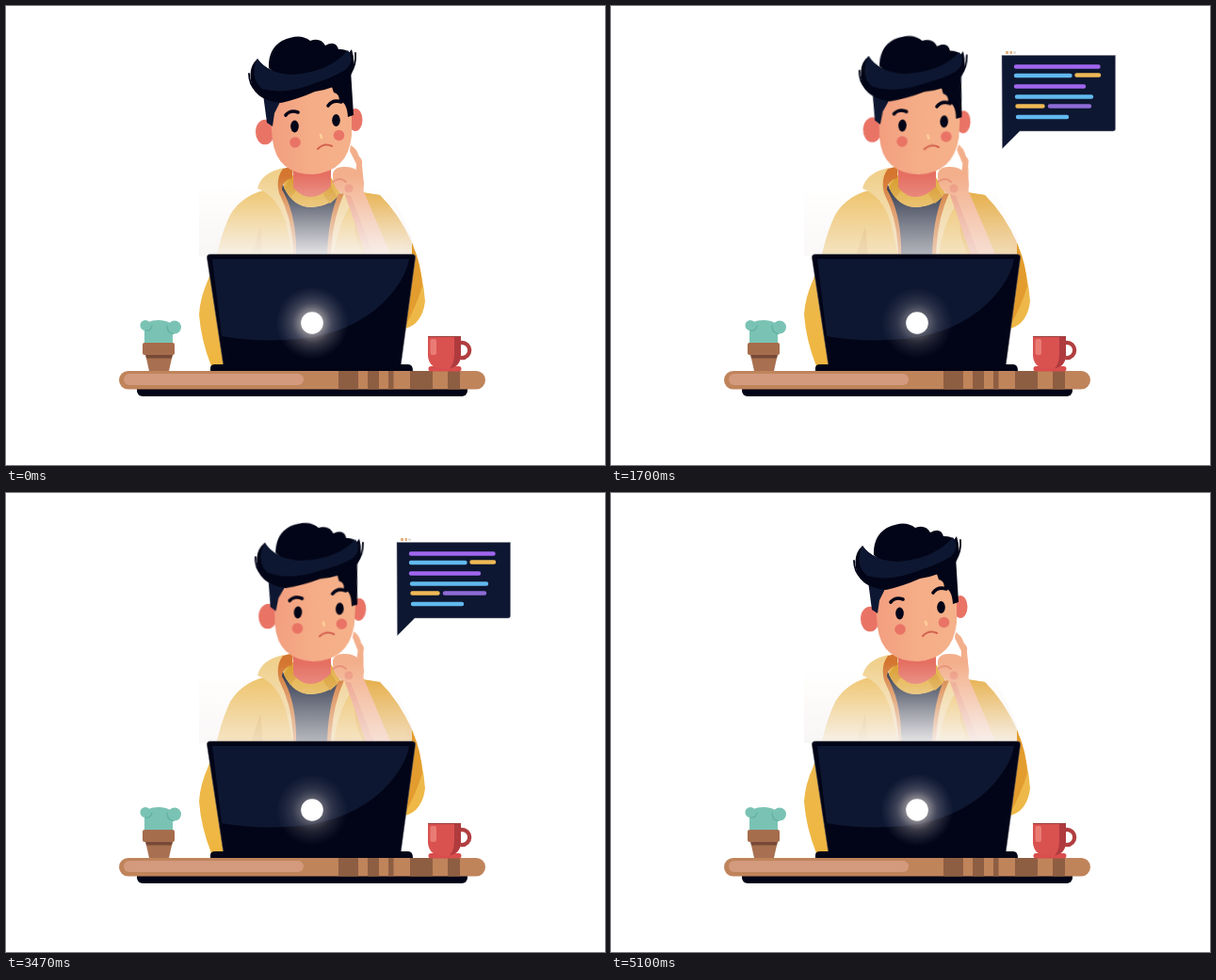
An HTML page without scripts for the animation above (5170 ms loop, 636x488 px).

```html
<!DOCTYPE html>
<html lang="en">
<head>
<meta charset="utf-8">
<title>Thinking developer</title>
<style>
  :root { --loop: 5170ms; --typing: calc(var(--loop) / 3); }
  html, body { margin: 0; width: 100%; height: 100%; overflow: hidden; background: #fff; }
  svg { display: block; width: 100%; height: 100%; }

  .head, .finger { animation: tilt var(--loop) infinite; }
  .head { --turn: 3.4deg; transform-origin: 326px 186px; }
  .finger { --turn: 5deg; transform-origin: 377px 186px; }
  @keyframes tilt {
    0%, 9.1% { transform: rotate(0deg); animation-timing-function: ease-in-out; }
    42%, 67.7% { transform: rotate(var(--turn)); animation-timing-function: ease-in-out; }
    98.6%, 100% { transform: rotate(0deg); }
  }

  .light { animation: light var(--loop) linear infinite; }
  @keyframes light {
    0%, 4.4% { opacity: 1; }
    13.3% { opacity: .05; }
    22.4% { opacity: .85; }
    32.9% { opacity: .75; }
    46.2% { opacity: .03; }
    47.5% { opacity: .03; }
    55.3% { opacity: 1; }
    66% { opacity: .8; }
    77.6% { opacity: .5; }
    80.5% { opacity: .2; }
    88% { opacity: .85; }
    98.6%, 100% { opacity: 1; }
  }

  .glow { animation: glow var(--loop) linear infinite; }
  @keyframes glow {
    0%, 4.4% { opacity: 1; }
    13.3% { opacity: .4; }
    22.4% { opacity: .75; }
    32.9% { opacity: .65; }
    46.2% { opacity: .5; }
    55.3% { opacity: 1; }
    66% { opacity: .7; }
    77.6% { opacity: .15; }
    88% { opacity: .7; }
    98.6%, 100% { opacity: 1; }
  }

  .bubble { transform-origin: 415px 151px; animation: pop var(--loop) infinite; }
  @keyframes pop {
    0%, 4.4% { transform: scale(0); animation-timing-function: ease-out; }
    9% { transform: scale(1.02); animation-timing-function: ease-in-out; }
    11.5%, 97.5% { transform: scale(1); animation-timing-function: step-end; }
    97.6%, 100% { transform: scale(0); }
  }

  /* reveals one code row after another */
  .reveal { animation: type var(--typing) step-end infinite; }
  @keyframes type {
    0% { transform: translateY(66px); }
    4.5% { transform: translateY(0); }
    20.2% { transform: translateY(11px); }
    26.2% { transform: translateY(21px); }
    32.1% { transform: translateY(32px); }
    38% { transform: translateY(43px); }
    43.9% { transform: translateY(54px); }
    49.9%, 100% { transform: translateY(66px); }
  }

  .line { fill: none; stroke-linecap: round; stroke-linejoin: round; }
  .ink { fill: #020517; }
  .navy { fill: #0e1731; }
  .skin { fill: #f3af8b; }
  .blush { fill: #e97466; }
</style>
</head>
<body>
<svg viewBox="0 0 636 488">
  <defs>
    <linearGradient id="veil" x1="0" y1="0" x2="0" y2="1">
      <stop offset="0" stop-color="#fff" stop-opacity="0"/>
      <stop offset=".3" stop-color="#fbf7f3" stop-opacity=".28"/>
      <stop offset=".65" stop-color="#f8f5f4" stop-opacity=".62"/>
      <stop offset="1" stop-color="#f8f6f5" stop-opacity=".93"/>
    </linearGradient>
    <radialGradient id="halo">
      <stop offset=".25" stop-color="#fff3e8" stop-opacity=".6"/>
      <stop offset=".55" stop-color="#c9c0c4" stop-opacity=".28"/>
      <stop offset="1" stop-color="#8088a0" stop-opacity="0"/>
    </radialGradient>
    <linearGradient id="face" x1="0" x2="1">
      <stop offset="0" stop-color="#f29d7f"/>
      <stop offset=".5" stop-color="#f5ad87"/>
      <stop offset="1" stop-color="#f5b18a"/>
    </linearGradient>
    <linearGradient id="coat" x1="0" y1="0" x2="0" y2="1">
      <stop offset="0" stop-color="#ecbd5b"/>
      <stop offset="1" stop-color="#efb640"/>
    </linearGradient>
    <clipPath id="typed"><rect class="reveal" x="420" y="-7" width="110" height="66"/></clipPath>
  </defs>

  <!-- coat -->
  <path fill="url(#coat)" d="M274 196Q250 202 238 222Q229 241 224 264L215 290Q206 310 205 328Q207 355 218 383H380L424 343Q442 338 445 314Q443 285 431 252Q418 222 397 201L366 196L324 230Z"/>
  <path fill="#e3a432" d="M377 198L397 201Q418 222 431 252L435 266L380 266Q362 232 377 198Z"/>
  <path fill="#e39c2e" d="M427 244Q441 270 442 298Q436 318 424 340V262Z"/>
  <path fill="#dea53d" d="M270 235L260 266H273Z"/>

  <!-- shirt, neck and hood -->
  <path fill="#202940" d="M292 185Q302 213 324 214Q345 212 356 198Q343 228 342 266H307Q308 225 292 198Z"/>
  <path fill="#e4ae40" d="M303 180Q294 184 295 193Q305 214 324 214Q345 213 355 199L345 182Z"/>
  <path fill="#d99c2b" d="M303 181L295 193L302 204L309 195ZM344 190L352 203L344 210L337 200Z"/>
  <path fill="#e56f62" d="M305 164H345V192Q334 203 324 203Q313 203 305 193Z"/>
  <path fill="#f0d08c" d="M295 172Q271 177 267 194Q288 202 297 230L305 266H307Q306 226 291 198Q287 185 295 172Z"/>
  <path fill="#d4762f" d="M294 173L305 170L304 183Q294 185 293 195Q309 222 308 266H305Q305 228 290 199Q286 184 294 173Z"/>
  <path fill="#f0d08c" d="M356 198L372 204Q353 226 348 266H342Q344 225 356 198Z"/>
  <path fill="#d4762f" d="M353 200L359 199Q346 228 345 266H341Q342 225 353 200Z"/>

  <!-- arm and hand -->
  <path class="skin" d="M358 195L378 193L409 266H383Z"/>
  <path fill="#eb9a80" d="M358 195L365 199L391 266H383Z"/>
  <path class="finger skin" d="M366 148Q372 151 375 160Q379 163 378 169L380 190L371 188L372 168L365 154Z"/>
  <path class="skin" d="M347 178Q349 171 358 171Q371 170 378 180Q382 193 378 199Q370 204 359 200Q346 195 347 178Z"/>
  <path class="line" stroke="#e88f77" stroke-width="2" d="M347 187Q355 181 361 187"/>
  <circle cx="364" cy="194" r="4.5" fill="#ed967d"/>

  <path class="light" fill="url(#veil)" d="M205 180H400L431 246V266H205Z"/>

  <!-- head -->
  <g class="head">
    <ellipse class="blush" cx="275" cy="134" rx="10" ry="13.3"/>
    <ellipse class="blush" cx="371" cy="121" rx="7.5" ry="12"/>
    <path fill="url(#face)" d="M279 96L283 143Q288 179 326 179Q363 176 367 138L367 82L320 78Z"/>
    <path class="navy" d="M273 94L277 124L283 128L285 114L292 100L318 91Z"/>
    <path class="ink" d="M344 80L348 92Q354 93 354 101Q362 102 363 118L369 116L366 68Z"/>
    <path class="ink" d="M279 66Q278 46 293 37Q312 28 323 37Q334 33 339 42Q350 36 353 46Q366 45 368 57L358 74L300 82Z"/>
    <path class="ink" d="M267 56Q256 66 261 84Q267 101 292 103Q310 99 328 91Q349 88 364 77Q373 65 367 46Q350 72 310 73Q278 73 267 56Z"/>
    <path class="navy" d="M267 56Q278 72 304 73Q344 70 363 47Q371 59 360 68Q347 76 328 82Q296 95 272 88Q258 76 267 56Z"/>
    <path class="line" stroke="#020517" stroke-width="1.8" d="M258 72Q258 83 266 91M371 50Q372 62 366 71"/>
    <g class="line" stroke="#020517" stroke-width="3.6">
      <path d="M297 116Q302 110 310 113"/>
      <path d="M342 106Q347 99 356 102"/>
    </g>
    <ellipse class="ink" cx="306.5" cy="128" rx="4.3" ry="6.4"/>
    <ellipse class="ink" cx="350.5" cy="121.5" rx="4.3" ry="6.4"/>
    <circle class="blush" cx="307" cy="145" r="5.8"/>
    <circle class="blush" cx="353.5" cy="137.5" r="5.8"/>
    <path class="line" stroke="#ffd09a" stroke-width="2.4" d="M334 137L335 140"/>
    <path class="line" stroke="#d2614f" stroke-width="2" d="M331 152Q338 145 346 149"/>
  </g>

  <!-- desk -->
  <rect class="ink" x="139" y="399" width="351" height="16" rx="6"/>
  <rect x="120" y="388" width="389" height="19.5" rx="9.7" fill="#c0845b"/>
  <rect x="125" y="391" width="191" height="12" rx="6" fill="#d39a7e"/>
  <path fill="#8e5e42" d="M353 388h21v19.500h-21zM384 388h12v19.500h-12zM406 388h5.500v19.500h-5.500zM429 388h24v19.500h-24zM469 388h13v19.500h-13z"/>

  <!-- laptop -->
  <path class="ink" stroke="#4a4a55" stroke-width=".6" d="M217 264H431Q435 264 434.500 268L419 383H231L213.500 268Q213 264 217 264Z"/>
  <path class="navy" d="M219 269H428Q424 292 400 316Q366 348 312 354Q267 358 229 351Z"/>
  <path class="ink" d="M217 388V385Q217 381 222 381H427Q432 381 432 388Z"/>
  <circle class="glow" cx="325" cy="337" r="39" fill="url(#halo)"/>
  <circle cx="325" cy="337" r="11.8" fill="#fff"/>

  <!-- cactus -->
  <g fill="#7ac3b4">
    <path d="M147 361V343Q148 334 162 334Q177 334 177 344V361Z"/>
    <circle cx="148" cy="339.500" r="5.500"/>
    <circle cx="179" cy="341.500" r="7"/>
  </g>
  <path class="line" stroke="#5fae9f" stroke-width="1.2" d="M148 345Q154 346 155 340M171 340Q171 348 178 348.500"/>
  <path fill="#a87050" d="M148 370H177L173 388H152Z"/>
  <path fill="#764a36" d="M148 370H177L176 374.500H149Z"/>
  <rect x="145" y="358" width="34" height="13" rx="2" fill="#a66d4d"/>

  <!-- cup -->
  <circle cx="484" cy="366" r="8.200" fill="none" stroke="#b13e40" stroke-width="4.200"/>
  <rect x="448.500" y="383" width="35" height="5.500" rx="2.700" fill="#d84d4d"/>
  <path fill="#d95250" d="M448 351H483V372Q482 386 466 386Q449 386 448 372Z"/>
  <path fill="#af3b3f" d="M476 351H483V372Q482 383 471 385.500Q476 380 476 370Z"/>
  <rect x="450.500" y="354" width="6.500" height="17" rx="2" fill="#e97c75"/>
  <path stroke="#9a403c" d="M448 351.500H483"/>

  <!-- code bubble -->
  <g class="bubble">
    <path fill="#e3b184" d="M419 48h3v3h-3zM423.500 48h2.500v3h-2.500z"/>
    <path fill="#dcd5cc" d="M427 48.500h3v2h-3z"/>
    <path class="navy" stroke="#777986" stroke-width=".5" d="M415 52.500H535.500V131Q535.500 133 533 133H434L415.500 151.500Z"/>
    <g class="line" stroke-width="4.400" clip-path="url(#typed)">
      <path stroke="#a066ee" d="M430 64.500H517.500M430 85.500H502"/>
      <path stroke="#61b9ee" d="M430 74H487.500M431 96.500H510M432 118H484"/>
      <path stroke="#eeb956" d="M494.500 73.500H518M431.500 106.500H458.500"/>
      <path stroke="#8f6bd6" d="M466 106.500H508"/>
    </g>
  </g>
</svg>
</body>
</html>
```
